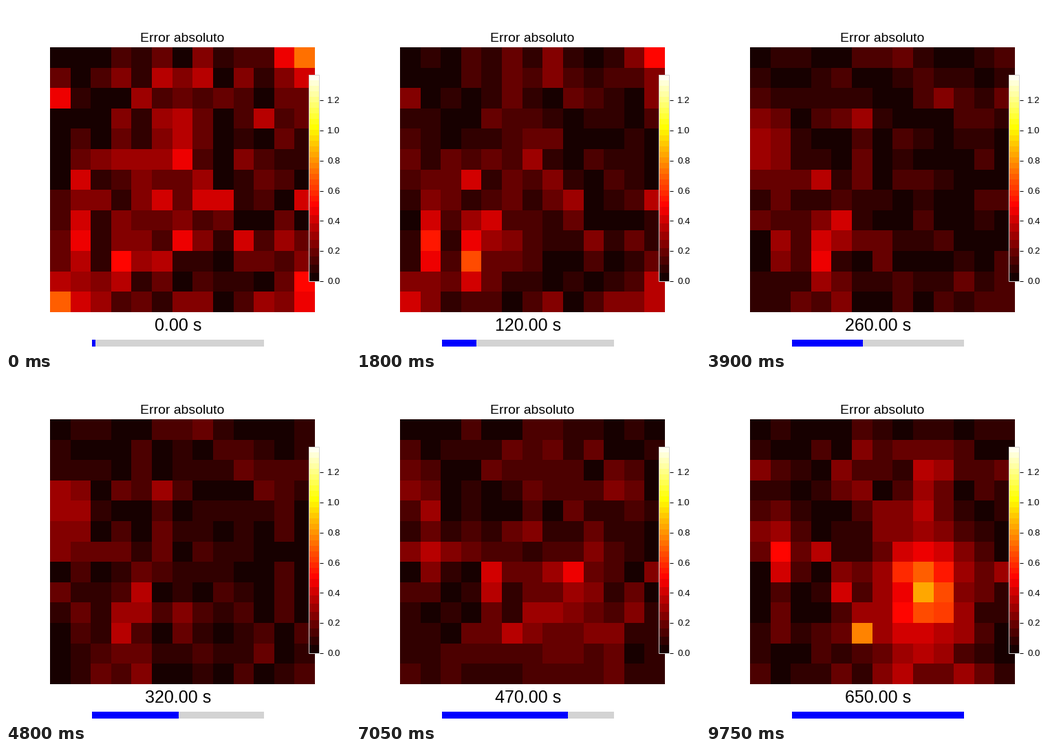
A matplotlib script that plays this animation: 500x500 px, repeating every 9.9 s.

```python
import matplotlib.pyplot as plt
import numpy as np
from matplotlib.animation import FuncAnimation
from matplotlib.colors import ListedColormap
from matplotlib.patches import Rectangle

SIZE, DPI = 500, 100
FRAMES, INTERVAL = 66, 150
END = 650
CELLS, VMAX = 13, 1.37
PT = 72 / DPI

# Warm spots: row, column, height, width, peak error, time of the peak
SPOTS = [
    (0, 11.8, 0.9, 0.7, 0.75, 0),
    (11.5, 12, 1.2, 0.6, 0.5, 0),
    (12, 0, 0.8, 0.8, 0.45, 0),
    (6.5, 5, 2.5, 1.5, 0.2, 0),
    (8.5, 1, 1.8, 0.4, 0.35, 80),
    (9.7, 3, 1.2, 0.5, 0.55, 180),
    (3.5, 0.3, 0.9, 0.6, 0.3, 350),
    (7.5, 4, 0.9, 0.4, 0.3, 480),
    (6.3, 1, 0.9, 0.4, 0.55, END),
    (10, 5, 0.4, 0.4, 0.5, END),
    (8.5, 7.8, 2.6, 1.7, 0.45, END),
    (7.8, 8.6, 1, 0.7, 0.35, END),
    (3, 8.2, 1.5, 0.6, 0.25, END),
]
SPOT_LIFE = 130


def banded_hot():
    """The hot map in flat bands, finer above pure red."""
    pos = np.linspace(0, 1, 1024, endpoint=False)
    low = (np.floor(pos / 0.04) + 0.5) * 0.04
    step = 0.64 / 24
    high = 0.36 + (np.floor((pos - 0.36) / step) + 0.5) * step
    return ListedColormap(plt.get_cmap("hot")(np.where(pos < 0.36, low, high)))


rng = np.random.default_rng(7)
wave_a, wave_b = rng.normal(size=(2, CELLS, CELLS))
rate = rng.uniform(0.003, 0.008, (CELLS, CELLS))
rows, cols = np.mgrid[:CELLS, :CELLS]


def error_at(time):
    strength = 0.11 + 0.07 * np.exp(-time / 100)
    swing = wave_a * np.cos(rate * time) + wave_b * np.sin(rate * time)
    field = strength * np.abs(swing)
    for row, col, h, w, peak, when in SPOTS:
        shape = np.exp(-(((rows - row) / h) ** 2 + ((cols - col) / w) ** 2) / 2)
        field += peak * shape * np.exp(-((time - when) / SPOT_LIFE) ** 2 / 2)
    return field


def label(x, y, text, px, **kwargs):
    return ax.text(x, y, text, fontsize=px * PT, color="black",
                   family="Liberation Sans", **kwargs)


def bar(x, y, w, h, **kwargs):
    return ax.add_patch(Rectangle((x, y), w, h, **kwargs))


cmap = banded_hot()
fig = plt.figure(figsize=(SIZE / DPI, SIZE / DPI), dpi=DPI, facecolor="white")
ax = fig.add_axes([0, 0, 1, 1])
style = dict(cmap=cmap, vmin=0, vmax=VMAX, aspect="auto",
             interpolation="nearest")

heat = ax.imshow(error_at(0), extent=(64, 449, 445, 60), **style)
ax.imshow(np.linspace(VMAX, 0, 300)[:, None],
          extent=(440, 455, 400, 100), zorder=2, **style)
bar(440, 100, 15, 300, fill=False, ec="#d3d3d3", lw=PT, zorder=3)
for i in range(7):
    y = 400 - i * 0.2 * 300 / VMAX
    ax.plot([456, 461], [y, y], color="black", lw=PT, zorder=3,
            solid_capstyle="butt")
    label(467, y + 4.2, f"{i * 0.2:.1f}", 13.2)

label(256, 52, "Error absoluto", 19.4, ha="center")
clock = label(250, 472.5, "", 25, ha="center")
bar(125, 485, 250, 10, fc="#d3d3d3", lw=0)
progress = bar(125, 485, 5, 10, fc="#0000ff", lw=0)

ax.set_xlim(0, SIZE)
ax.set_ylim(SIZE, 0)
ax.axis("off")


def update(i):
    time = 10 * i
    heat.set_data(error_at(time))
    clock.set_text(f"{time:.2f} s")
    progress.set_width(min(250, 250 * (i + 1) / FRAMES + 1.2))
    return heat, clock, progress


anim = FuncAnimation(fig, update, frames=FRAMES, interval=INTERVAL, repeat=True)
plt.show()
```
